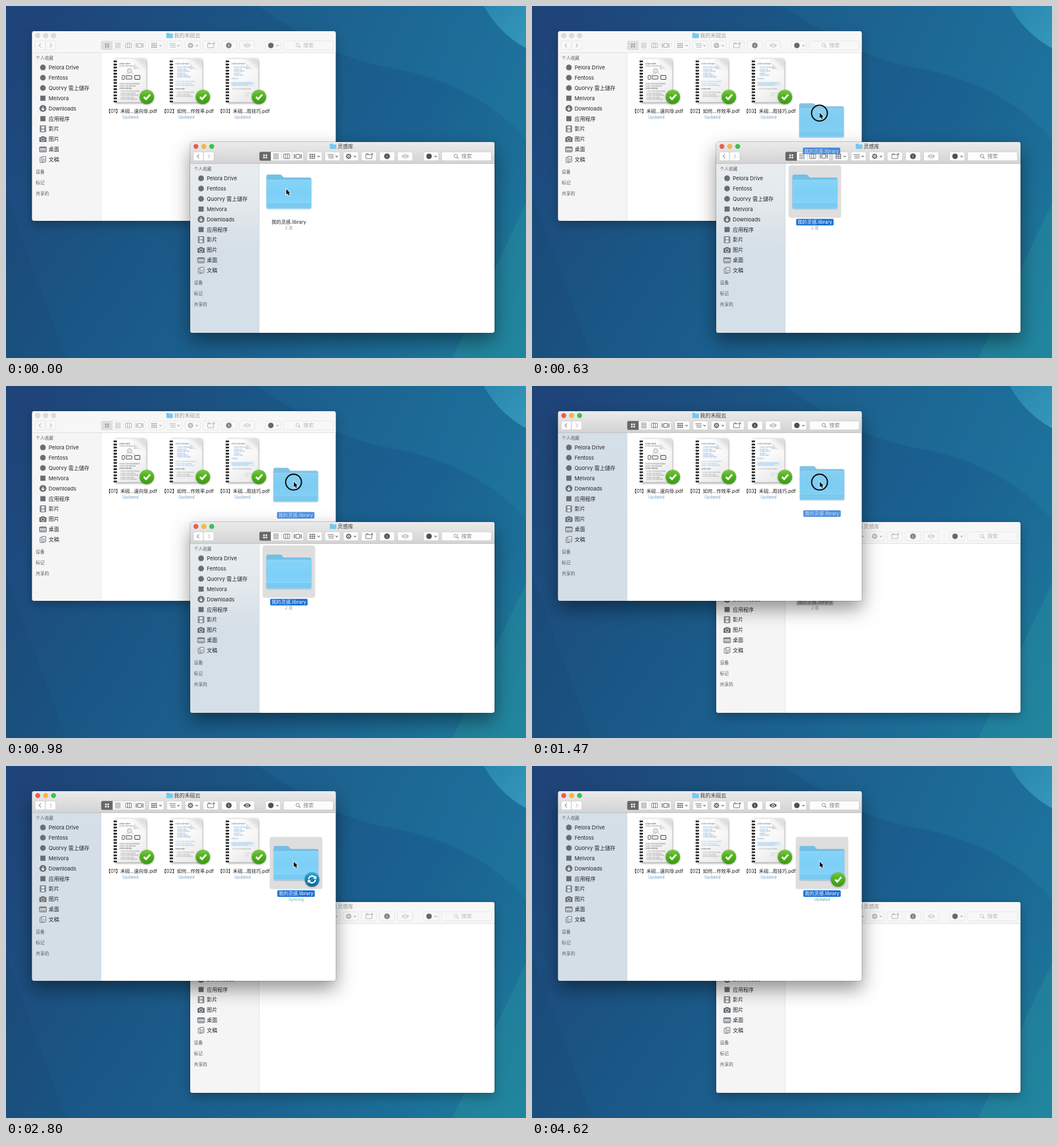
An HTML page with a canvas that plays this animation: 909x616 px, repeating every 4.69 s.

```html
<!DOCTYPE html>
<html lang="zh">
<head>
<meta charset="utf-8">
<title>拖放文件夹</title>
<style>
html, body { margin: 0; width: 100%; height: 100%; overflow: hidden; background: #1b5785; }
canvas { display: block; width: 909px; height: 616px; }
</style>
</head>
<body>
<canvas id="stage" width="909" height="616"></canvas>
<script>
const c = document.getElementById('stage').getContext('2d');
const W = 909, H = 616, LOOP = 4690, STEP = 70;
const FONT = 'Inter, "Noto Sans CJK SC", "Noto Sans CJK", sans-serif';
const PRESS = 140, ARRIVE = 770, RAISE = 1190, DROP = 1820, SYNC = 1960, DONE = 4060;
const LABEL = '我的灵感.library';
const SIDEBAR = ['Pelora Drive', 'Fentoss', 'Quorvy 雲上儲存', 'Melvora', 'Downloads',
  '应用程序', '影片', '图片', '桌面', '文稿'];
const FILES = ['【01】禾砚...速向导.pdf', '【02】如何...作效率.pdf', '【03】禾砚...用技巧.pdf'];

function text(s, x, y, size, color, align = 'left') {
  c.font = `${size}px ${FONT}`;
  c.textAlign = align;
  c.fillStyle = color;
  c.fillText(s, x, y + size * 0.36);
}
function box(x, y, w, h, r, fill, stroke) {
  c.beginPath();
  c.roundRect(x, y, w, h, r);
  if (fill) { c.fillStyle = fill; c.fill(); }
  if (stroke) { c.strokeStyle = stroke; c.stroke(); }
}
function disc(x, y, r, fill, stroke) {
  c.beginPath();
  c.arc(x, y, r, 0, 7);
  if (fill) { c.fillStyle = fill; c.fill(); }
  if (stroke) { c.strokeStyle = stroke; c.stroke(); }
}
function line(points, color, width = 1) {
  c.beginPath();
  points.forEach(([x, y]) => c.lineTo(x, y));
  c.strokeStyle = color;
  c.lineWidth = width;
  c.stroke();
}
function shape(path, fill) {
  c.fillStyle = fill;
  c.fill(new Path2D(path));
}
function gradient(x0, y0, x1, y1, ...colors) {
  const g = c.createLinearGradient(x0, y0, x1, y1);
  colors.forEach((color, i) => g.addColorStop(i / (colors.length - 1), color));
  return g;
}
function shadow(color, blur, dy) {
  c.shadowColor = color;
  c.shadowBlur = blur;
  c.shadowOffsetY = dy;
}
function at(x, y, draw) {
  c.save();
  c.translate(x, y);
  draw();
  c.restore();
}

function wallpaper() {
  c.fillStyle = gradient(60, 0, W, 560, '#1f4479', '#1a5685', '#1b6391', '#207f9d');
  c.fillRect(0, 0, W, H);
  shape('M440 0C510 48 585 92 665 107C770 125 850 165 909 235V0Z',
    gradient(440, 0, 909, 120, 'rgba(32,110,155,.25)', 'rgba(30,118,160,.65)'));
  shape('M835 0Q862 48 909 74V0Z', gradient(840, 0, 909, 60, '#2a86ae', '#3496b9'));
  shape('M577 107Q690 110 780 145T909 235V345L780 616H577Z', 'rgba(22,94,144,.12)');
  shape('M909 345L780 616H909Z', 'rgba(38,145,160,.3)');
  shape('M0 330L105 616H0Z', 'rgba(22,66,105,.2)');
}

function smallFolder(x, y) {
  box(x, y, 5, 4, 1, '#62b9e6');
  box(x, y + 1, 11.5, 8, 1, '#76c9f2');
}

function sidebarIcon(i, y, color) {
  const x = 19;
  c.lineWidth = 1;
  if (i < 3) disc(x, y, 5, color);
  else if (i === 3 || i === 5) box(x - 4.5, y - 4.5, 9, 9, 0, color);
  else if (i === 4) {
    disc(x, y, 6, color);
    line([[x, y - 3.2], [x, y + 2.5]], '#fff', 1.4);
    line([[x - 2.6, y + 0.2], [x, y + 3], [x + 2.6, y + 0.2]], '#fff', 1.3);
  } else if (i === 6) {
    box(x - 5.5, y - 6, 11, 12, 1, color);
    box(x - 2.8, y - 4.8, 5.6, 4.3, 0, '#e4e9ed');
    box(x - 2.8, y + 0.6, 5.6, 4.3, 0, '#e4e9ed');
    for (let k = -5; k < 6; k += 2.5) {
      box(x - 4.8, y + k, 1.1, 1, 0, '#e4e9ed');
      box(x + 3.7, y + k, 1.1, 1, 0, '#e4e9ed');
    }
  } else if (i === 7) {
    box(x - 3, y - 5, 6, 4, 1, color);
    box(x - 6.2, y - 3.5, 12.4, 8.5, 1, color);
    disc(x, y + 0.7, 2.8, null, '#f2f2f2');
  } else if (i === 8) {
    box(x - 6, y - 4.5, 12, 9, 1, '#c9cfd3', color);
    line([[x - 6, y - 3], [x + 6, y - 3]], color, 1.4);
    c.setLineDash([1.2, 1]);
    line([[x - 4.5, y + 2.5], [x + 5, y + 2.5]], color, 1.8);
    c.setLineDash([]);
  } else {
    box(x - 5, y - 4, 6.5, 9, 0.5, null, color);
    box(x - 1.8, y - 5.5, 6.8, 9.5, 0.5, '#e9edf0', color);
    line([[x, y - 1], [x + 3.5, y - 1]], color, 0.8);
    line([[x, y + 1.2], [x + 3.5, y + 1.2]], color, 0.8);
  }
}

function chevron(x, y, color) {
  line([[x - 2, y - 1], [x, y + 1.2], [x + 2, y - 1]], color, 1.1);
}

function toolbar(active, canPreview) {
  const ink = active ? '#5d5d5d' : '#a6a6a6', faint = active ? '#bcbcbc' : '#cfcfcf';
  const y = 25, fill = active ? '#fdfdfd' : '#f8f8f8', edge = active ? '#c9c9c9' : '#e2e2e2';
  const button = (x, w) => { c.lineWidth = 0.8; box(x, 17.2, w, 15.6, 2.5, fill, edge); };
  button(5.5, 17.5); button(23.5, 18);
  line([[15.5, 21.5], [12.3, 25], [15.5, 28.5]], active ? '#777' : '#aaa', 1.1);
  line([[31.2, 21.5], [34.4, 25], [31.2, 28.5]], active ? '#bbb' : '#aaa', 1.1);

  button(121, 77);
  box(121, 17.2, 20, 15.6, [2.5, 0, 0, 2.5], active ? '#686868' : '#dedede');
  for (const dx of [-3.3, 0.8]) for (const dy of [-3.3, 0.8])
    box(131 + dx, y + dy, 2.7, 2.7, 0.4, active ? '#fff' : '#999');
  for (const x of [159.5, 178.5]) line([[x, 17.5], [x, 32.5]], edge, 0.7);
  for (let k = -4; k < 5; k += 2.7) line([[145, y + k], [155, y + k]], ink, 0.9);
  c.lineWidth = 0.9;
  box(163.5, 21, 10.5, 8, 0.5, null, ink);
  line([[167, 21], [167, 29]], ink, 0.9);
  line([[170.5, 21], [170.5, 29]], ink, 0.9);
  c.lineWidth = 1;
  box(185, 21.5, 6, 7, 0.5, null, ink);
  for (const x of [181.5, 183, 193, 194.5]) line([[x, 21.2], [x, 28.8]], ink, 0.8);

  [204, 235.5, 267.5, 299, 331, 362.5, 408].forEach(x => button(x, 26.5));
  for (let i = 0; i < 3; i++) for (let j = 0; j < 3; j++)
    box(208.5 + i * 3.6, 20.8 + j * 3.2, 2.6, 2, 0.2, ink);
  for (let j = 0; j < 3; j++) line([[240 + j, 22 + j * 3], [251, 22 + j * 3]], ink, 0.9);
  c.lineWidth = 1.5;
  disc(277, y, 3.1, null, ink);
  for (let a = 0; a < 8; a++) {
    const u = Math.cos(a * Math.PI / 4), v = Math.sin(a * Math.PI / 4);
    line([[277 + u * 3, y + v * 3], [277 + u * 4.8, y + v * 4.8]], ink, 1.5);
  }
  disc(277, y, 1, ink);
  [224.5, 256, 288, 429].forEach(x => chevron(x, y, ink));
  c.lineWidth = 0.9;
  box(307, 22, 10.5, 7, 0.5, null, ink);
  line([[307, 22], [308, 20.5], [311, 20.5], [312, 22]], ink, 0.9);
  line([[316.5, 21], [320, 21]], ink, 0.9);
  line([[318.2, 19.3], [318.2, 22.8]], ink, 0.9);
  disc(344, y, 5, active ? '#555' : '#858585');
  text('i', 344, y, 7.5, '#fff', 'center');
  const eye = canPreview ? '#555' : faint;
  shape('M369.500 25Q376 17.500 382.500 25Q376 32.500 369.500 25Z', eye);
  disc(376, y, 2.6, '#fff');
  disc(376, y, 1.5, eye);
  disc(417.5, y, 4.8, active ? '#505050' : '#686868');
  button(439.5, 87);
  const hint = active ? '#858585' : '#bbb';
  c.lineWidth = 1;
  disc(464.3, 24.3, 2.9, null, hint);
  line([[466.4, 26.5], [469, 29]], hint, 1.1);
  text('搜索', 474, y, 9.2, hint);
}

function finder({ x, y, w, h, title, active, canPreview, sidebar }, content) {
  at(x, y, () => {
    shadow(active ? 'rgba(0,0,0,.42)' : 'rgba(0,0,0,.26)', active ? 32 : 18, active ? 14 : 7);
    box(0, 0, w, h, 4, '#fff');
    shadow('transparent', 0, 0);
    c.lineWidth = 1;
    box(-0.5, -0.5, w + 1, h + 1, 4.5, null, 'rgba(0,0,0,.18)');
    c.save();
    box(0, 0, w, h, 4);
    c.clip();
    c.fillStyle = active ? gradient(0, 38, 0, 190, ...sidebar) : '#f5f5f5';
    c.fillRect(0, 38, 120.5, h);
    line([[120.5, 38], [120.5, h]], active ? '#c9d2d9' : '#dedede', 0.8);
    c.fillStyle = active ? gradient(0, 0, 0, 38, '#ebebeb', '#d3d3d3') : '#f7f7f7';
    c.fillRect(0, 0, w, 38);
    line([[0, 37.7], [w, 37.7]], active ? '#b5b5b5' : '#d6d6d6', 0.8);
    c.restore();

    ['#f25a52', '#f6b93b', '#35c748'].forEach((color, i) => {
      c.lineWidth = 0.6;
      disc(10 + i * 13.8, 7.7, 4.2, active ? color : '#dcdcdc', active ? 'rgba(0,0,0,.12)' : '#cacaca');
    });
    c.font = `9.2px ${FONT}`;
    const left = 264.5 - (c.measureText(title).width + 13.5) / 2;
    smallFolder(left, 3.3);
    text(title, left + 13.5, 7.8, 9.2, active ? '#3a3a3a' : '#9b9b9b');
    toolbar(active, canPreview);

    text('个人收藏', 6.5, 47.7, 7.7, '#5f6366');
    SIDEBAR.forEach((name, i) => {
      const row = 63.6 + i * 17.92;
      sidebarIcon(i, row, '#6a6e71');
      text(name, 29, row, 9.2, '#232527');
    });
    ['设备', '标记', '共享的'].forEach((name, i) => text(name, 6.5, 246 + i * 19.3, 7.7, '#54585b'));
    content();
  });
}

function badge(x, y, done) {
  shadow('rgba(0,0,0,.35)', 3, 1);
  disc(x, y, 12.6, done ? gradient(x, y - 12, x, y + 12, '#78c640', '#4fae20', '#3f9a16')
    : gradient(x, y - 12, x, y + 12, '#2fa9d8', '#1283bb', '#0b669c'));
  shadow('transparent', 0, 0);
  if (done) {
    line([[x - 5.3, y + 0.2], [x - 1.4, y + 4], [x + 5.7, y - 4]], '#fff', 3.2);
    return;
  }
  for (const turn of [0, Math.PI]) at(x, y, () => {
    c.rotate(turn);
    c.beginPath();
    c.arc(0, 0, 6, Math.PI * 1.02, Math.PI * 1.8);
    c.strokeStyle = '#fff';
    c.lineWidth = 2.3;
    c.stroke();
    shape('M7.5 -6.5L7.5 -0.8L1.8 -1.2Z', '#fff');
  });
}

function tinyRows(x, y, rows, color, width = 30) {
  for (let i = 0; i < rows; i++)
    text('文件同步与协作的使用说明和操作步骤'.slice(0, Math.floor(width / 2.4) - (i * 3) % 5),
      x, y + i * 3.4, 2.4, color);
}

// Coordinates are relative to the page's top left corner.
function documentIcon(kind) {
  shadow('rgba(0,0,0,.5)', 4, 1);
  box(0, 0, 54, 76, [0, 3, 0, 0], gradient(0, 0, 54, 76, '#fff', '#f8f8f8', '#e6e6e6'));
  shadow('transparent', 0, 0);
  if (kind === 0) {
    tinyRows(7, 9, 1, '#222', 20);
    tinyRows(7, 13, 1, '#777', 30);
    line([[16, 31], [26, 21], [36, 31]], '#aaa', 0.7);
    disc(25, 21, 4, '#e4e4e4', '#999');
    c.lineWidth = 1;
    box(12, 29, 4, 7, 0.7, '#fff', '#444');
    box(19, 29.5, 10, 6, 0.6, '#eee', '#444');
    box(34, 29, 9, 7, 0.6, '#eee', '#333');
    tinyRows(7, 44, 2, '#666', 38);
    tinyRows(7, 52, 1, '#222', 22);
    tinyRows(9, 57, 5, '#888', 35);
  } else if (kind === 1) {
    tinyRows(7, 9, 1, '#555', 24);
    tinyRows(10, 15, 6, '#5799d3', 26);
    tinyRows(7, 40, 3, '#8dbbe2', 38);
    tinyRows(7, 53, 1, '#333', 18);
    tinyRows(9, 59, 3, '#999', 32);
  } else {
    tinyRows(7, 9, 1, '#555', 26);
    tinyRows(11, 15, 5, '#5799d3', 22);
    tinyRows(7, 35, 1, '#4789c5', 12);
    box(6, 40, 41, 8, 0, '#dcebf7');
    tinyRows(8, 42.5, 2, '#8dbbe2', 37);
    tinyRows(8, 53, 1, '#999', 34);
    tinyRows(30, 61, 2, '#bbb', 15);
  }
  shape('M26 0H51Q54 0 54 3V27C49 18 40 17 32 18C35 10 32 4 26 0Z',
    gradient(33, 19, 47, 4, '#c4c4c4', '#f8f8f8', '#dedede'));
  for (let y = 3; y < 75; y += 5.4) {
    box(-3, y, 6, 2.8, 1, '#151515');
    box(-1.8, y + 0.6, 2.6, 0.7, 0, '#777');
  }
}

function folder(x, y) {
  shadow('rgba(30,80,120,.4)', 2, 1);
  shape(`M${x} ${y + 3}q0-3 3-3h21q2 0 3 2l1.5 2q1 1.3 3 1.3h43.500q3 0 3 3v49q0 2-2 2h-74q-2 0-2-2z`,
    '#73bfe7');
  shadow('transparent', 0, 0);
  box(x, y + 9.5, 78, 50, [1, 1, 2, 2], gradient(0, y + 9, 0, y + 59, '#85d4f8', '#7dcff7', '#86d6fc'));
  line([[x + 0.5, y + 9.5], [x + 77.5, y + 9.5]], '#9adcf9', 0.8);
  for (let k = 51.5; k < 59; k += 2.6) line([[x + 0.5, y + k], [x + 77.5, y + k]], '#68b4dc', 0.9);
}

function nameTag(x, y, fill, color) {
  c.font = `8.3px ${FONT}`;
  const w = c.measureText(LABEL).width + 5;
  if (fill) box(x - w / 2, y - 5.8, w, 11.6, 1.8, fill);
  text(LABEL, x, y, 8.3, color, 'center');
}

// x is the centre, y the top of the folder.
function folderItem(x, y, { selected, tag, color = '#fff', note }) {
  if (selected) box(x - 46, y - 16, 92, 91.5, 4, '#dedede');
  folder(x - 39, y);
  nameTag(x, y + 83.3, tag, color);
  if (note) text(note, x, y + 93.6, 6.9, '#6e9cc2', 'center');
}

function pointer(x, y) {
  at(x, y, () => {
    const arrow = new Path2D('M0 0V9.600L2.200 7.600L3.800 11L5.500 10.200L4 7H6.900Z');
    c.strokeStyle = '#fff';
    c.lineWidth = 1.6;
    c.stroke(arrow);
    c.fillStyle = '#000';
    c.fill(arrow);
  });
}

// The sideways part of the drag finishes ahead of the upward part.
function travel(t) {
  const u = Math.min(1, Math.max(0, (t - PRESS) / (ARRIVE - PRESS)));
  const up = u * u * (3 - 2 * u);
  return { up, across: 1 - (1 - up) ** 2 };
}

function cloudWindow(t) {
  finder({
    x: 45.5, y: 44, w: 531, h: 332, title: '我的禾砚云',
    active: t >= RAISE, canPreview: t >= DROP, sidebar: ['#d5dfe8', '#d3dee7']
  }, () => {
    FILES.forEach((name, i) => {
      const x = 98 * i;
      at(x + 145.5, 48.5, () => documentIcon(i));
      badge(x + 200.7, 115, true);
      text(name, x + 174, 140.5, 8.3, '#1d1d1d', 'center');
      text('Updated', x + 172, 151, 6.9, '#6e9cc2', 'center');
    });
    if (t < DROP) return;
    const note = t >= DONE ? 'Updated' : t >= SYNC ? 'Syncing' : '';
    folderItem(461.5, 96, { selected: true, tag: '#1b6fd3', note });
    if (note) badge(489.5, 154.5, t >= DONE);
  });
}

function ideasWindow(t) {
  const front = t < RAISE, held = t >= PRESS;
  finder({
    x: 322, y: 238, w: 532, h: 334, title: '灵感库',
    active: front, canPreview: false, sidebar: ['#e9edf0', '#e2e8ec', '#d5dfe7']
  }, () => {
    if (t >= DROP) return;
    folderItem(172.5, 57, {
      selected: held, note: '2 项',
      tag: held && (front ? '#1b6fd3' : '#d0d0d0'),
      color: !held ? '#222' : front ? '#fff' : '#555'
    });
  });
}

function draw(t) {
  wallpaper();
  const layers = [cloudWindow, ideasWindow];
  if (t >= RAISE) layers.reverse();
  layers.forEach(layer => layer(t));

  const p = travel(t), x = 490 + 13 * p.across, y = 320.5 - 153 * p.up;
  if (t >= PRESS && t < DROP) {
    const lag = travel(t - 30);
    const settle = Math.min(1, Math.max(0, (t - RAISE) / 210));
    c.globalAlpha = 0.78;
    folderItem(495 + 11.5 * lag.across + 0.5 * settle, 295 - 152 * lag.up - 3 * settle, { tag: '#1b6fd3' });
    c.globalAlpha = 1;
    c.lineWidth = 2.2;
    disc(x - 0.3, y + 0.7, 13.8, null, '#0c0c0c');
  }
  pointer(x, y);
}

let start;
function tick(now) {
  start ??= now;
  draw(Math.floor(((now - start) % LOOP) / STEP) * STEP);
  requestAnimationFrame(tick);
}
requestAnimationFrame(tick);
</script>
</body>
</html>
```
